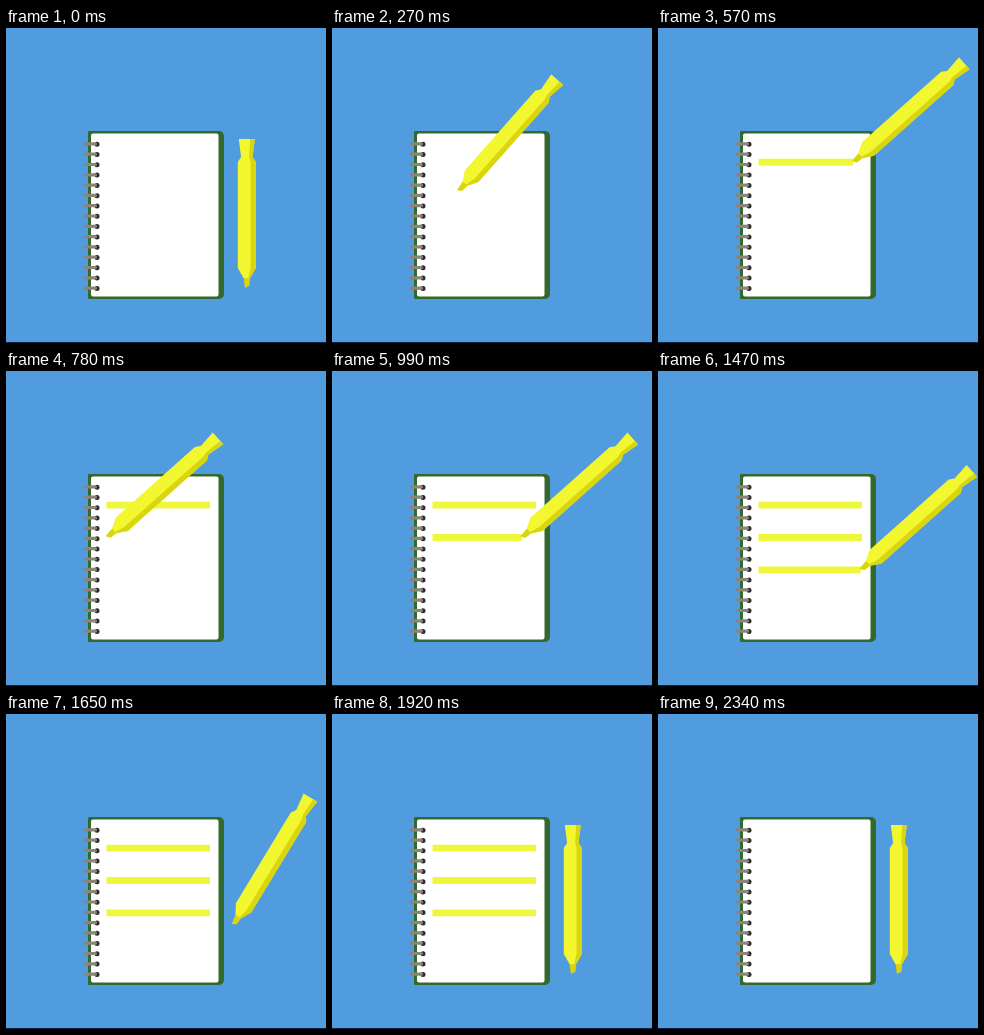
An HTML page with a canvas for the animation above (2.4 s loop, 320 px wide and 315 px high).

```html
<!DOCTYPE html>
<html lang="en">
<head>
<meta charset="utf-8">
<title>Highlighter and notebook</title>
<style>
html, body { margin: 0; width: 100%; height: 100%; overflow: hidden; background: #519bdf; }
canvas { display: block; width: 320px; height: 315px; }
</style>
</head>
<body>
<canvas id="stage" width="320" height="315"></canvas>
<script>
const ctx = document.getElementById('stage').getContext('2d');
const LOOP = 2400, STEP = 30;
const FIRST = 353, STROKE = 264, PERIOD = 434.5;
const LIFT = FIRST + 2 * PERIOD + STROKE, REST = 1895;
const FADE_START = 2150, FADE_END = 2325;
const TILT = 48.3 * Math.PI / 180;
const HOME = { x: 240, y: 185, angle: 0 };
const LEFT = 101, RIGHT = 204.5;
const YELLOW = '#f3f730', SHADE = '#d9d610', MARK = '#eff73c';

const clamp = v => Math.max(0, Math.min(1, v));
const span = (t, from, to) => clamp((t - from) / (to - from));
const ease = u => u * u * (3 - 2 * u);
const mix = (a, b, u) => a + (b - a) * u;
const bend = (a, b, c, u) => mix(mix(a, b, u), mix(b, c, u), u);
const rowY = i => 134.2 + 32.3 * i;

function box(color, x, y, w, h, radii = 0) {
  ctx.fillStyle = color;
  ctx.beginPath();
  ctx.roundRect(x, y, w, h, radii);
  ctx.fill();
}

function strokeProgress(t, i) {
  const start = FIRST + i * PERIOD;
  return ease(span(t, start, start + STROKE));
}

// Pose of the tilted pen when its nib touches (x, y).
const touching = (x, y) => ({ x: x + 54.7, y: y - 50.3, angle: TILT });

// Swings the pen between two poses along a curve through a control point.
const swing = (from, control, to, u, turn) => ({
  x: bend(from.x, control.x, to.x, u),
  y: bend(from.y, control.y, to.y, u),
  angle: mix(from.angle, to.angle, turn)
});

function penPose(t) {
  if (t < FIRST) {
    const u = t / FIRST;
    return swing(HOME, { x: 198, y: 131 }, touching(LEFT, rowY(0)), u, ease(u));
  }
  if (t >= LIFT) {
    const u = ease(span(t, LIFT, REST));
    return swing(touching(RIGHT, rowY(2)), { x: 278, y: 134 }, HOME, u, u);
  }
  const i = Math.floor((t - FIRST) / PERIOD);
  const back = ease(span(t, FIRST + i * PERIOD + STROKE, FIRST + (i + 1) * PERIOD));
  const along = strokeProgress(t, i) - back;
  return touching(mix(LEFT, RIGHT, along), rowY(i + back));
}

function drawNotebook() {
  box('#33692c', 82, 103, 136, 168, [1, 5, 5, 1]);
  box('#fff', 85, 105.5, 127.5, 163, 2);
}

function drawRings() {
  for (let i = 0; i < 15; i++) {
    const y = 116 + i * 10.3;
    box('#302c2b', 88.5, y - 2.3, 5, 5, 2.5);
    box('#8b837c', 77.5, y - 1.7, 13.5, 3.2, 1.5);
  }
}

function drawMarks(t) {
  ctx.globalAlpha = 1 - span(t, FADE_START, FADE_END);
  for (let i = 0; i < 3; i++) {
    box(MARK, LEFT - 0.5, rowY(i) - 3.4, (RIGHT - LEFT) * strokeProgress(t, i), 6.8);
  }
  ctx.globalAlpha = 1;
}

// Half-width of the barrel at key heights, from cap to neck.
const PROFILE = [
  { y: -74, half: 8 },
  { y: -56, half: 5.7 },
  { y: -51, half: 9 },
  { y: 55, half: 9 },
  { y: 65, half: 3.3 }
];

function barrel(color, inner) {
  const axis = 0.8;
  ctx.fillStyle = color;
  ctx.beginPath();
  PROFILE.forEach(p => ctx.lineTo(axis + p.half, p.y));
  [...PROFILE].reverse().forEach(p => ctx.lineTo(axis + p.half * inner, p.y));
  ctx.fill();
}

function nib() {
  ctx.fillStyle = SHADE;
  ctx.beginPath();
  ctx.moveTo(-2.5, 64.5);
  ctx.lineTo(4.1, 64.5);
  ctx.lineTo(3.5, 72.5);
  ctx.lineTo(-1, 75);
  ctx.fill();
}

function drawPen({ x, y, angle }) {
  ctx.save();
  ctx.translate(x, y);
  ctx.rotate(angle);
  nib();
  barrel(YELLOW, -1);
  barrel(SHADE, 0.42);
  ctx.restore();
}

function render(elapsed) {
  const t = Math.min(Math.floor((elapsed % LOOP) / STEP) * STEP, LOOP - 2 * STEP);
  box('#519bdf', 0, 0, 320, 315);
  drawNotebook();
  drawMarks(t);
  drawRings();
  drawPen(penPose(t));
  box('#10203c', 0, 314, 320, 1);
}

let start;
function tick(now) {
  start ??= now;
  render(now - start);
  requestAnimationFrame(tick);
}
render(0);
requestAnimationFrame(tick);
</script>
</body>
</html>
```
